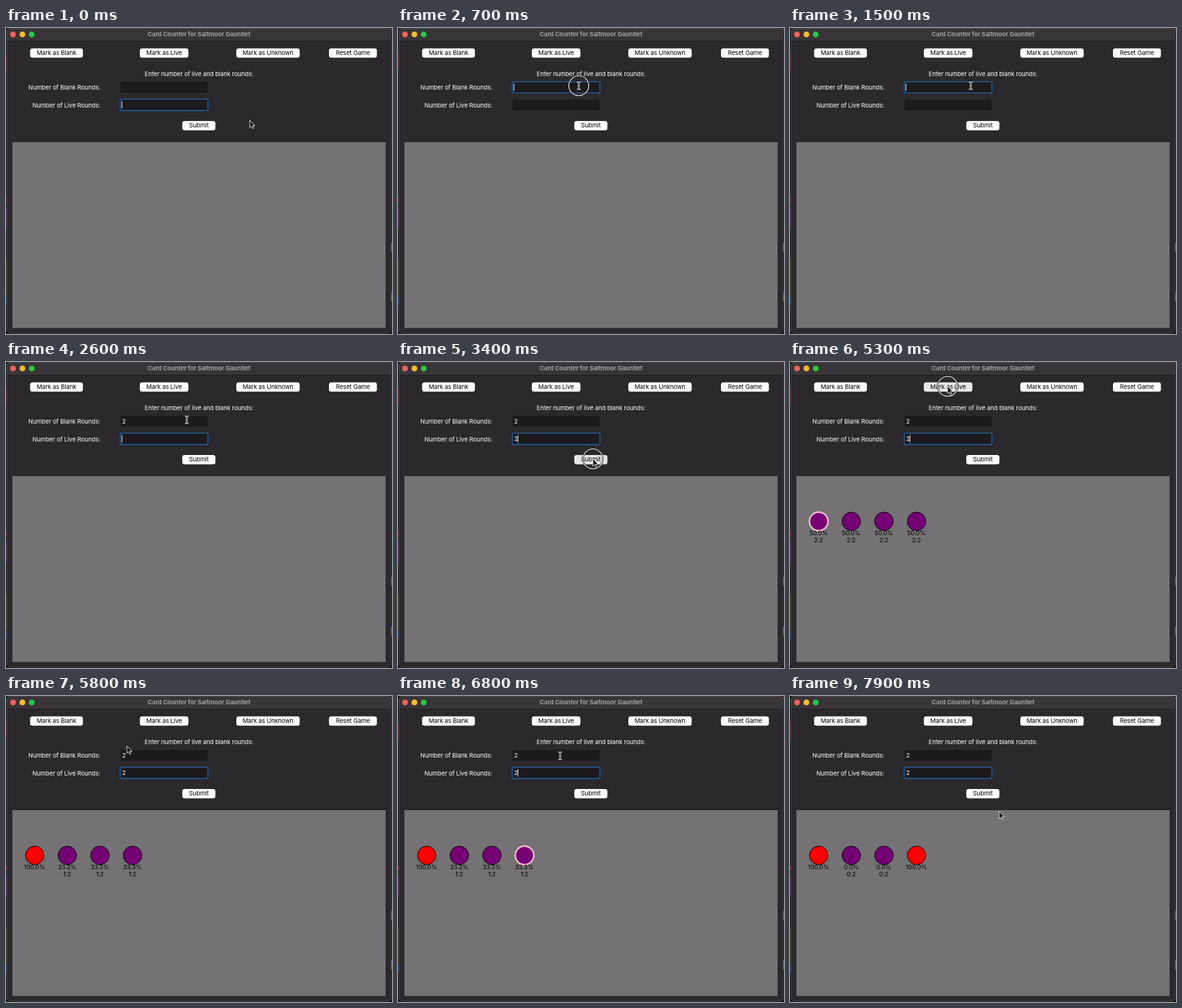
An HTML page for the animation above (8 s loop, 600 by 477 pixels).

```html
<!DOCTYPE html>
<html lang="en">
<head>
<meta charset="utf-8">
<title>Card Counter</title>
<style>
  html, body { margin: 0; width: 100%; height: 100%; overflow: hidden; background: #141314; }
  svg { display: block; width: 600px; height: 477px; }
  text { font: 9.5px Inter, "Open Sans", sans-serif; letter-spacing: -.12px; fill: #fff; }
  .title { font-weight: 700; fill: #a09ea0; }
  .mid { text-anchor: middle; }
  .end { text-anchor: end; }
  .dark text, text.dark { fill: #000; }
  .entry { fill: #1c1a1c; }
  .ring { fill: none; stroke: #225c97; stroke-width: 1.6; }
</style>
</head>
<body>
<svg viewBox="0 0 600 477">
  <g id="edges">
    <path d="M0 40h2v26h-2z" fill="#501523"/>
    <path d="M0 265h2v6h-2z" fill="#8a1c3c"/>
    <path d="M0 281h2v30h-2z" fill="#57206e"/>
    <path d="M0 362h2v55h-2z" fill="#384414"/>
    <path d="M0 419h2v12h-2z" fill="#1d4a8c"/>
    <path d="M598 0h2v5h-2z" fill="#8a2030"/>
    <path d="M598 335h2v14h-2zM598 412h2v14h-2z" fill="#686668"/>
  </g>
  <rect x="1" width="598" height="476" rx="6" fill="#2b292b"/>
  <path d="M1 20V6q0-6 6-6h586q6 0 6 6v14z" fill="#373537"/>
  <path d="M1 20.5h598" stroke="#1d1b1d"/>
  <rect x="1.5" y=".5" width="597" height="475.5" rx="6" fill="none" stroke="#575557" stroke-width=".7"/>
  <circle cx="11" cy="10" r="4.5" fill="#ff5f57"/>
  <circle cx="25.5" cy="10" r="4.5" fill="#febc2e"/>
  <circle cx="40" cy="10" r="4.5" fill="#28c840"/>
  <text class="title mid" x="300" y="13.4">Card Counter for Saltmoor Gauntlet</text>

  <g id="buttons"></g>
  <text class="mid" x="300" y="74.6">Enter number of live and blank rounds:</text>
  <text class="end" x="146.5" y="96.4">Number of Blank Rounds:</text>
  <text class="end" x="146.5" y="124">Number of Live Rounds:</text>
  <rect class="entry" x="178" y="84" width="135.5" height="17"/>
  <rect class="entry" x="178" y="111.3" width="135.5" height="17"/>
  <rect id="ring" class="ring" x="177.6" width="136.3" height="17.6" rx="1"/>
  <text id="blank" x="180.4" y="96">2</text>
  <text id="live" x="180.4" y="123.4">2</text>
  <rect id="caret" width="1" height="11.5" fill="#fff"/>

  <rect x="10" y="178" width="580" height="289.5" fill="#747274"/>
  <g id="balls" class="dark mid"></g>

  <g id="pointer">
    <g id="click" fill="none">
      <circle r="15.5" stroke="#222" stroke-width="2.6"/>
      <circle r="15.5" stroke="#fff" stroke-width="1.1"/>
    </g>
    <path id="arrow" d="M0 0V11.2L2.6 8.8 4.3 12.7 6.2 11.9 4.5 8.1H8z" fill="#000" stroke="#fff" stroke-width=".9"/>
    <g id="beam" fill="none">
      <path d="M-3-5.5Q0-5.5 0-3.5 0-5.5 3-5.5M-3 5.5Q0 5.5 0 3.5 0 5.5 3 5.5M0-4V4M-1.7 1H1.7" stroke="#fff" stroke-width="2.2"/>
      <path d="M-3-5.5Q0-5.5 0-3.5 0-5.5 3-5.5M-3 5.5Q0 5.5 0 3.5 0 5.5 3 5.5M0-4V4M-1.7 1H1.7" stroke="#222" stroke-width=".8"/>
    </g>
  </g>
</svg>
<script>
const LOOP = 8000, STEP = 100;
const $ = id => document.getElementById(id);

function add(parent, tag, attrs, text = '') {
  const el = document.createElementNS('http://www.w3.org/2000/svg', tag);
  for (const key in attrs) el.setAttribute(key, attrs[key]);
  el.textContent = text;
  return parent.appendChild(el);
}
const show = (el, on) => el.setAttribute('visibility', on ? 'visible' : 'hidden');
const within = (t, a, b) => t >= a && t < b;

function button(label, x, y, width) {
  const box = add($('buttons'), 'rect', { x, y, width, height: 14.5, rx: 3.5, fill: '#fff' });
  add($('buttons'), 'text', { x: x + width / 2, y: y + 10.4, class: 'mid dark' }, label);
  return box;
}
button('Mark as Blank', 37.5, 31.7, 82);
const markLive = button('Mark as Live', 208, 31.7, 75.5);
button('Mark as Unknown', 358, 31.7, 98.5);
button('Reset Game', 502, 31.7, 74.5);
const submit = button('Submit', 274, 145, 51.5);

const balls = [0, 1, 2, 3].map(i => {
  const x = 44.6 + i * 50.7, g = $('balls');
  return {
    disc: add(g, 'circle', { cx: x, cy: 248.4, r: 14.4 }),
    odds: add(g, 'text', { x: x - .3, y: 270 }),
    ratio: add(g, 'text', { x: x - .3, y: 280.8 })
  };
});

// Pointer stops: time, x, y
const path = [
  [100, 379, 144], [500, 281, 90], [2700, 281, 90], [2900, 290, 112],
  [3200, 303, 151], [3700, 303, 151], [4600, 58, 232], [4800, 48, 246],
  [5000, 48, 246], [5300, 245, 38], [5500, 245, 38], [5600, 232, 38],
  [5800, 188, 78], [6100, 40, 273], [6400, 196, 252], [6500, 196, 252],
  [6800, 252, 93], [7000, 254, 38], [7400, 254, 38], [7700, 292, 250], [7900, 325, 180]
];
const clicks = [[600, 800], [3300, 3500], [4800, 5000], [5300, 5500], [6400, 6600]];

function pointerAt(t) {
  const n = path.findIndex(p => p[0] > t);
  if (n === 0) return path[0].slice(1);
  if (n < 0) return path[path.length - 1].slice(1);
  const [t0, x0, y0] = path[n - 1], [t1, x1, y1] = path[n];
  const u = (t - t0) / (t1 - t0), k = u * u * (3 - 2 * u);
  return [x0 + (x1 - x0) * k, y0 + (y1 - y0) * k];
}

function drawForm(t) {
  const onBlank = within(t, 600, 2400);
  const typed = onBlank ? t >= 1800 : t >= 2700;
  const start = onBlank ? 600 : t < 600 ? 0 : t < 6000 ? 2400 : 2700;
  $('ring').setAttribute('y', onBlank ? 83.7 : 111);
  $('caret').setAttribute('x', typed ? 185.8 : 179.7);
  $('caret').setAttribute('y', onBlank ? 86.6 : 114);
  show($('caret'), (t - start) % 900 < 600);
  show($('blank'), t >= 1800);
  show($('live'), t >= 2700);
  submit.setAttribute('fill', within(t, 3300, 3500) ? '#e9e8e9' : '#fff');
  markLive.setAttribute('fill', within(t, 5300, 5500) ? '#e9e8e9' : '#fff');
}

function drawBalls(t) {
  show($('balls'), t >= 3600);
  const found = t >= 7400 ? 2 : t >= 5500 ? 1 : 0;
  const odds = ['50.0%', '33.3%', '0.0%'][found];
  balls.forEach(({ disc, odds: top, ratio }, i) => {
    const red = i === 0 && found > 0 || i === 3 && found > 1;
    const picked = i === 0 && within(t, 4900, 5500) || i === 3 && within(t, 6500, 7400);
    disc.setAttribute('fill', red ? '#fe0000' : '#740074');
    disc.setAttribute('stroke', picked ? '#ffc0cb' : '#000');
    disc.setAttribute('stroke-width', picked ? 2.3 : 1);
    top.textContent = red ? '100.0%' : odds;
    ratio.textContent = red ? '' : `${2 - found}:2`;
  });
}

function drawPointer(t) {
  const [x, y] = pointerAt(t);
  const text = within(x, 177, 314) && (within(y, 83, 102) || within(y, 110, 129));
  $('pointer').setAttribute('transform', `translate(${x} ${y})`);
  show($('beam'), text);
  show($('arrow'), !text);
  show($('click'), clicks.some(c => within(t, ...c)));
}

function frame(now) {
  const t = Math.floor(now % LOOP / STEP) * STEP;
  drawForm(t);
  drawBalls(t);
  drawPointer(t);
  requestAnimationFrame(frame);
}
frame(0);
</script>
</body>
</html>
```
